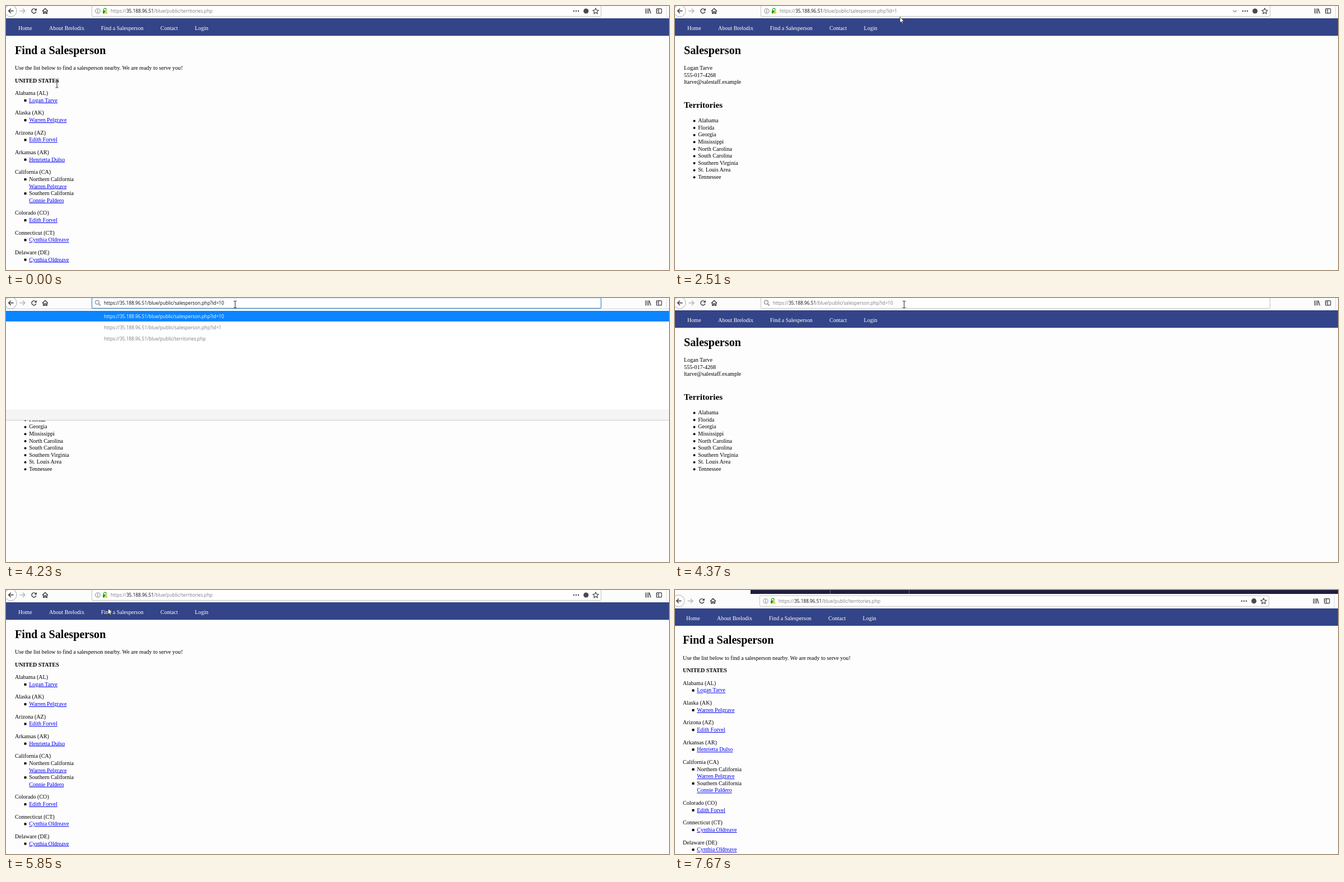
An HTML page that plays this animation: 1185x472 px, repeating every 8000 ms.

```html
<!DOCTYPE html>
<html lang="en">
<head>
<meta charset="utf-8">
<title>Find a Salesperson</title>
<style>
  html, body { margin: 0; width: 100%; height: 100%; overflow: hidden; background: #fdfdfd; }
  svg { display: block; width: 1185px; height: 472px; }
  text { font: 10.08px "Liberation Serif", "Times New Roman", serif; fill: #000; white-space: pre; }
  .h1 { font-size: 20.16px; font-weight: bold; }
  .h2 { font-size: 15.12px; font-weight: bold; }
  .b { font-weight: bold; }
  .nav text { fill: #fff; }
  .link { fill: #00e; text-decoration: underline; }
  .url, .url tspan { font-family: "Open Sans", "Noto Sans", sans-serif; font-size: 8.25px; }
  .url { fill: #7c7c7c; }
  .url .host { fill: #0c0c0d; }
  .focus .url, .focus .url .host { fill: #0c0c0d; }
  .selected .url, .selected .url .host { fill: #fff; }
  .ico { fill: none; stroke: #3a3a3c; stroke-width: 1.4; }
  #field { fill: #fff; stroke: #c3c3c3; }
  .hover #field { stroke: #9a9a9a; }
  .focus #field { stroke: #4a90d0; stroke-width: 1.3; }
  .off { display: none; }
</style>
</head>
<body>
<svg viewBox="0 0 1185 472">
  <g id="scene">
    <rect x="-5" y="-20" width="1200" height="520" fill="#fdfdfd"/>

    <g id="territories"></g>
    <g id="person" class="off"></g>

    <g class="nav">
      <rect x="-5" y="22" width="1200" height="31.3" fill="#334488"/>
      <text x="22" y="43">Home</text>
      <text x="77" y="43">About Brelodix</text>
      <text x="169.7" y="43">Find a Salesperson</text>
      <text x="276" y="43">Contact</text>
      <text x="337.5" y="43">Login</text>
    </g>

    <g id="bar">
      <rect x="-5" y="-3.7" width="1200" height="25.7" fill="#fcfcfc"/>
      <path d="M137-20h1060v16.3H137z" fill="#1e1f40"/>
      <path d="M279.5-20v16.3M420.5-20v16.3" stroke="#6a6b82"/>
      <path d="M1180.5-2v22" stroke="#dedede"/>
      <circle cx="8.5" cy="8.7" r="10.5" fill="#fff" stroke="#aaa"/>
      <path class="ico" d="M13.5 8.8H4.8M8.8 4.7L4.6 8.8l4.2 4.1"/>
      <path class="ico" style="stroke:#b5b5b7" d="M24.5 8.8h9.2M29.8 4.7L34 8.8l-4.2 4.1"/>
      <g id="reload">
        <path class="ico" d="M52.9 6.2a4 4 0 1 0 .9 3.8"/>
        <path d="M54.8 4v4.2h-4.2z" fill="#3a3a3c"/>
      </g>
      <g id="turn" class="off"><path class="ico" d="M45.8 5l6 6"/><circle cx="53" cy="12.3" r=".6"/></g>
      <path id="stop" class="ico off" d="M46 5l8 8M54 5l-8 8"/>
      <path class="ico" d="M65 9.2l5-4.7 5 4.7M66.7 8.5v4.7h2.1v-3h2.4v3h2.1V8.5"/>

      <rect id="field" x="153.5" y="-.5" width="910" height="19" rx="1.5"/>
      <g id="identity">
        <circle class="ico" style="stroke:#777;stroke-width:.9" cx="164" cy="9" r="4.1"/>
        <path d="M164 6.3v1.2M164 8.3v3.3" stroke="#666" stroke-width="1.1"/>
        <path d="M174.5 8V6.5a2.3 2.3 0 0 1 4.6 0V8" fill="none" stroke="#18a818" stroke-width="1.3"/>
        <rect x="173" y="8" width="7" height="5.5" rx=".8" fill="#18a818"/>
        <path d="M179 7.6l3.4 6h-6.8z" fill="#f7c51e" stroke="#fff" stroke-width=".5"/>
      </g>
      <g id="search" class="off">
        <circle class="ico" style="stroke:#888;stroke-width:1.2" cx="163" cy="7.8" r="3.4"/>
        <path d="M165.5 10.3l3.3 3.3" stroke="#888" stroke-width="1.6"/>
      </g>
      <rect id="mark" class="off" x="187" y="3" width="212" height="12" fill="#0078d7"/>
      <text id="url" class="url" y="12.3"><tspan>https://</tspan><tspan class="host">35.188.96.51</tspan><tspan id="path"></tspan></text>
      <path id="caret" class="off" d="M399.4 3.2v11.8" stroke="#000" stroke-width=".9"/>
      <path id="chevron" class="ico off" style="stroke:#777;stroke-width:1.1" d="M997.3 7.6l3.2 3.2 3.2-3.2"/>
      <g id="actions">
        <g fill="#4a4a4c">
          <circle cx="1015" cy="9" r="1.25"/><circle cx="1019" cy="9" r="1.25"/><circle cx="1023" cy="9" r="1.25"/>
          <circle cx="1036.7" cy="9" r="4.6"/>
        </g>
        <path class="ico" style="stroke-width:1.1" d="M1054 4.1l1.5 3.2 3.5.5-2.5 2.4.6 3.5-3.1-1.7-3.1 1.7.6-3.5-2.5-2.4 3.5-.5z"/>
      </g>
      <path class="ico" d="M1143.3 4.5v9M1146 4.5v9M1148.7 4.5v9M1149.8 4.8l2.8 8.7" style="stroke-width:1.2"/>
      <rect class="ico" style="stroke-width:1.2" x="1162.6" y="4.9" width="9.2" height="8" rx="1"/>
      <path class="ico" style="stroke-width:1" d="M1166.6 5v8M1163.8 7.3h1.6M1163.8 9.3h1.6"/>
    </g>

    <g id="popup" class="off">
      <rect x="-1" y="19.5" width="1187" height="199" fill="#fff" stroke="#ccc"/>
      <rect x="0" y="23" width="1185" height="19" fill="#0a84ff"/>
      <rect x="0" y="199" width="1185" height="19" fill="#f5f5f6"/>
    </g>
  </g>

  <g id="cursor">
    <path id="beam" d="M-2.5-6h2l.5.5.5-.5h2M0-5.5v11M-2.5 6h2l.5-.5.5.5h2" fill="none" stroke="#222" stroke-width="1"/>
    <path id="hand" d="M-1 9V1q0-1 1-1t1 1v4q1-.8 2 .2 1-.7 2 .3 1.4-.5 1.6 1V10q0 2-.9 3v1.5H.2L-3.4 9.7Q-4 8-2.5 8z" fill="#fff" stroke="#111" stroke-width=".9" stroke-linejoin="round"/>
    <path id="arrow" d="M0 0v10.6l2.5-2.3 1.6 3.7 1.6-.7L4.2 7.7h3.3z" fill="#fff" stroke="#111" stroke-width=".7"/>
  </g>
</svg>

<script>
const $ = id => document.getElementById(id);
const show = (id, on) => $(id).classList.toggle('off', !on);
const LINE = 12.6, GAP = 10.08;

function add(parent, tag, attrs, content = '') {
  const el = document.createElementNS('http://www.w3.org/2000/svg', tag);
  for (const key in attrs) el.setAttribute(key, attrs[key]);
  el.textContent = content;
  parent.append(el);
}
const write = (parent, x, y, content, cls = '') => add(parent, 'text', { x, y, class: cls }, content);

// Territory list: state, then salespeople as "name" or "area:name"
const WARREN = 'Warren Pelgrave', EDITH = 'Edith Forvel', CYNTHIA = 'Cynthia Oldreave';
const states = [
  ['Alabama (AL)', 'Logan Tarve'],
  ['Alaska (AK)', WARREN],
  ['Arizona (AZ)', EDITH],
  ['Arkansas (AR)', 'Henrietta Dulso'],
  ['California (CA)', 'Northern California:' + WARREN, 'Southern California:Connie Paldero'],
  ['Colorado (CO)', EDITH],
  ['Connecticut (CT)', CYNTHIA],
  ['Delaware (DE)', CYNTHIA],
  ['Florida (FL)']
];

function buildTerritories(page) {
  write(page, 16, 85.8, 'Find a Salesperson', 'h1');
  write(page, 16, 114, 'Use the list below to find a salesperson nearby. We are ready to serve you!');
  write(page, 16, 136.6, 'UNITED STATES', 'b');
  let y = 159.2;
  for (const [state, ...people] of states) {
    write(page, 16, y, state);
    for (const person of people) {
      add(page, 'rect', { x: 32.5, y: y + LINE - 4.9, width: 4, height: 4 });
      const parts = person.split(':');
      parts.forEach((part, i) =>
        write(page, 41.2, y += LINE, part, i === parts.length - 1 ? 'link' : ''));
    }
    y += LINE + GAP;
  }
}

function buildPerson(page) {
  write(page, 16, 85.8, 'Salesperson', 'h1');
  ['Logan Tarve', '555-017-4268', 'ltarve@salestaff.example']
    .forEach((line, i) => write(page, 16, 114 + i * LINE, line));
  write(page, 16, 181.8, 'Territories', 'h2');
  ['Alabama', 'Florida', 'Georgia', 'Mississippi', 'North Carolina', 'South Carolina',
   'Southern Virginia', 'St. Louis Area', 'Tennessee'].forEach((name, i) => {
    const y = 208.2 + i * LINE;
    add(page, 'circle', { cx: 34.5, cy: y - 2.7, r: 2 });
    write(page, 41.2, y, name);
  });
}

const LIST = 'territories.php', PERSON = 'salesperson.php?id=1';
buildTerritories($('territories'));
buildPerson($('person'));
[PERSON + '0', PERSON, LIST].forEach((file, i) => {
  write($('popup'), 175, 35.5 + i * 20, 'https://35.188.96.51/blue/public/' + file, 'url');
});
$('popup').querySelector('text').style.fill = '#fff';

// Each step changes only the listed parts; at = [shape, x, y]
const steps = [
  [0, { at: ['beam', 91, 140], page: 'territories', file: LIST, load: 'reload', field: '' }],
  [120, { at: ['beam', 90, 145] }],
  [240, { at: ['beam', 88, 154] }],
  [370, { at: ['beam', 86, 164] }],
  [520, { at: ['hand', 84, 172.5] }],
  [800, { at: ['hand', 83.5, 173.5] }],
  [1230, { load: 'turn' }],
  [1370, { at: ['hand', 91.5, 173.5] }],
  [1490, { load: 'stop', page: 'person', file: PERSON }],
  [1610, { at: ['arrow', 90, 170] }],
  [1750, { at: ['arrow', 120, 160] }],
  [1870, { at: ['arrow', 225, 120] }],
  [2000, { at: ['arrow', 340, 75], load: 'turn' }],
  [2120, { at: ['arrow', 401, 49], load: 'reload' }],
  [2270, { at: ['arrow', 401, 37] }],
  [2390, { at: ['arrow', 402, 26] }],
  [2510, { at: ['arrow', 402, 19.5], chevron: 1 }],
  [2660, { at: ['beam', 404, 18], field: 'hover' }],
  [2790, { at: ['beam', 406, 20] }],
  [2940, { at: ['beam', 408, 14] }],
  [3060, { at: ['beam', 409.5, 11.5], field: 'focus selected' }],
  [3360, { field: 'focus', caret: 1 }],
  [3490, { caret: 0 }],
  [3950, { caret: 1 }],
  [4230, { file: PERSON + '0', typed: 1, popup: 1, caret: 0, chevron: 0 }],
  [4370, { popup: 0, field: '' }],
  [4610, { load: 'turn' }],
  [4730, { load: 'stop' }],
  [5150, { page: 'territories', file: LIST, typed: 0 }],
  [5300, { at: ['beam', 408, 9], load: 'turn' }],
  [5450, { at: ['arrow', 365, 14], load: 'reload' }],
  [5570, { at: ['arrow', 290, 30] }],
  [5700, { at: ['arrow', 215, 38] }],
  [5850, { at: ['arrow', 182.5, 33] }],
  [5980, { at: ['arrow', 150, 46] }],
  [6130, { at: ['arrow', 126, 40] }],
  [6260, { at: ['beam', 216, 13], chevron: 1 }],
  [6410, { at: ['beam', 222, 14], chevron: 0 }],
  [6560, { at: ['arrow', 205, 36] }],
  [6690, { at: ['arrow', 164, 42], chevron: 1 }],
  [6830, { at: ['beam', 200, 10], field: 'hover' }],
  [6960, { at: ['arrow', 238, -7.5], field: '', chevron: 0 }],
  [7110, { at: ['none', 0, 0] }],
  [7670, { shifted: 1 }]
];

function draw(t) {
  const s = Object.assign({}, ...steps.filter(step => step[0] <= t).map(step => step[1]));
  const [shape, x, y] = s.at;
  for (const id of ['beam', 'hand', 'arrow']) show(id, id === shape);
  for (const id of ['territories', 'person']) show(id, id === s.page);
  for (const id of ['reload', 'turn', 'stop']) show(id, id === s.load);
  for (const id of ['chevron', 'caret', 'popup']) show(id, s[id]);
  show('identity', !s.typed);
  show('actions', !s.typed);
  show('search', s.typed);
  show('mark', s.field.includes('selected'));
  $('bar').setAttribute('class', s.field);
  $('url').setAttribute('x', s.typed ? 175 : 187);
  $('path').textContent = '/blue/public/' + s.file;
  $('cursor').setAttribute('transform', `translate(${x} ${y})`);
  $('scene').setAttribute('transform', s.shifted ? 'translate(-2 10.7)' : '');
}

function tick() {
  draw(performance.now() % 8000);
  requestAnimationFrame(tick);
}
tick();
</script>
</body>
</html>
```
